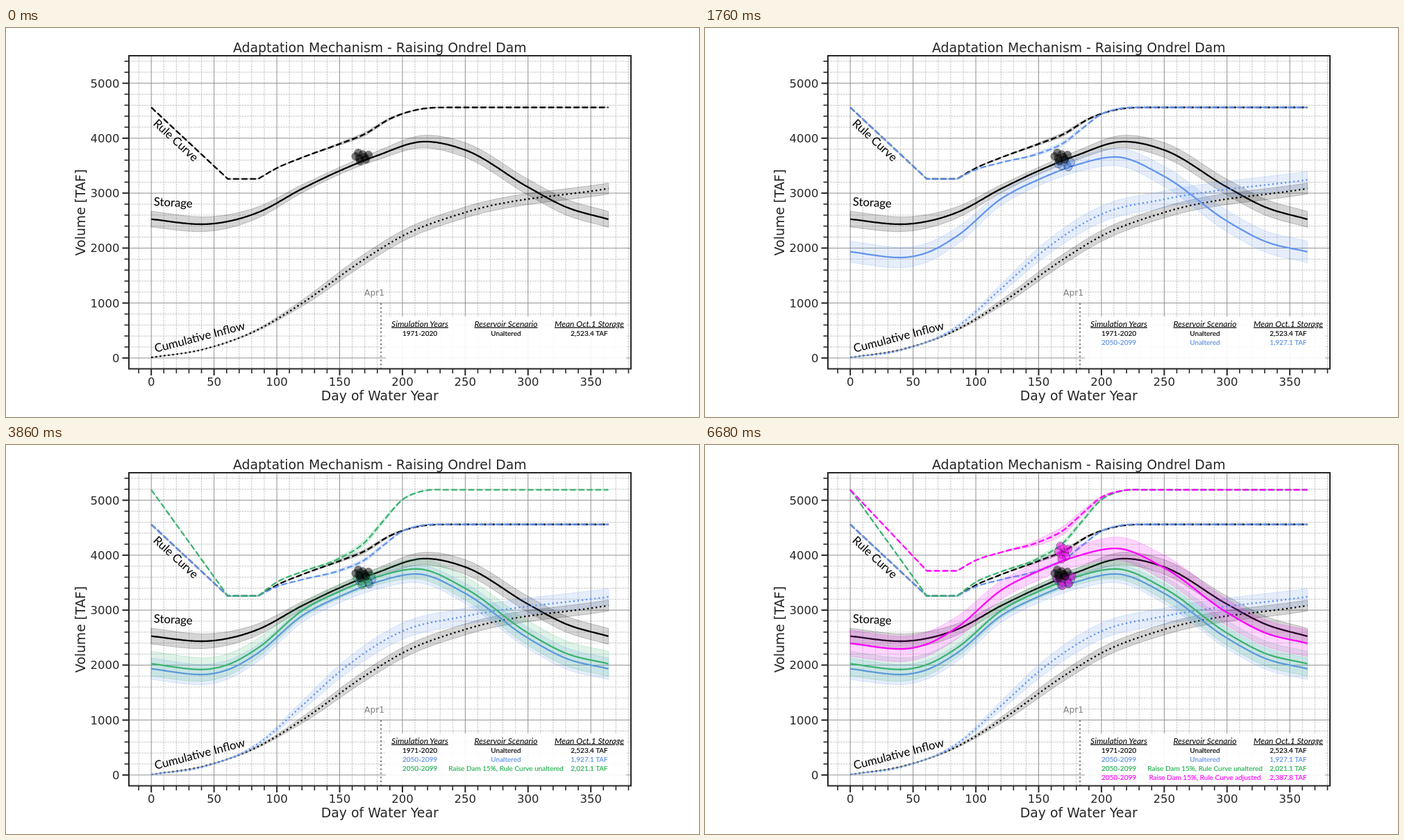
Recreate the animation shown at these times as an HTML page. Size 998 px wide and 561 px high, loop 8000 ms.

```html
<!DOCTYPE html>
<html lang="en">
<head>
<meta charset="utf-8">
<style>
html, body { margin: 0; width: 100%; height: 100%; overflow: hidden; background: #fff; }
svg { display: block; width: 100%; height: 100%; }
text { font-family: "DejaVu Sans", sans-serif; fill: #262626; }
.hand text { font-family: Lato, sans-serif; fill: inherit; }
</style>
</head>
<body>
<svg id="stage" viewBox="0 0 998 561"></svg>
<script>
const stage = document.getElementById('stage');
const LOOP = 8000, INK = '#262626';
const X = day => 209.2 + day * 1.8086;
const Y = taf => 475.9 - taf * 0.07925;

function add(parent, tag, attrs = {}, content = '') {
  const el = document.createElementNS('http://www.w3.org/2000/svg', tag);
  for (const key in attrs) el.setAttribute(key, attrs[key]);
  el.textContent = content;
  return parent.appendChild(el);
}
const line = (x1, y1, x2, y2, stroke, width, dash = 'none') =>
  add(stage, 'path', { d: `M${x1} ${y1}L${x2} ${y2}`, stroke, 'stroke-width': width, 'stroke-dasharray': dash });
const label = (parent, x, y, size, content, attrs = {}) =>
  add(parent, 'text', { x, y, 'font-size': size, 'text-anchor': 'middle', ...attrs }, content);

// Cubic Hermite curve through [day, value] points, flat at every extremum.
function curve(points) {
  const step = points.slice(1).map(([x], i) => x - points[i][0]);
  const slope = step.map((h, i) => (points[i + 1][1] - points[i][1]) / h);
  const tangent = points.map((_, i) => {
    const a = slope[i - 1], b = slope[i];
    if (a === undefined || b === undefined) return a ?? b;
    return a * b > 0 ? (a * step[i] + b * step[i - 1]) / (step[i] + step[i - 1]) : 0;
  });
  return day => {
    let i = 0;
    while (i < step.length - 1 && day >= points[i + 1][0]) i++;
    const h = step[i], t = (day - points[i][0]) / h, u = 1 - t;
    return points[i][1] * u * u * (1 + 2 * t) + points[i + 1][1] * t * t * (1 + 2 * u)
      + h * t * u * (tangent[i] * u - tangent[i + 1] * t);
  };
}
const bell = (day, mid, width) => Math.exp(-(((day - mid) / width) ** 2));

// Falls in a straight line, rests on the floor, then refills along `rise`.
const rule = (top, floor, rise) => day =>
  day < 61 ? top + (floor - top) * day / 61 : day < 85 ? floor : floor + (top - floor) * rise(day);

const pastRise = curve([[85, 0], [100, .152], [120, .298], [150, .49], [170, .628], [190, .84], [211, .965], [235, 1], [364, 1]]);
const futureRise = curve([[85, 0], [100, .13], [120, .228], [150, .355], [170, .505], [185, .71], [200, .906], [215, .985], [235, 1], [364, 1]]);

const pastStorage = curve([[0, 2526], [40, 2434], [61, 2485], [85, 2649], [120, 3078], [150, 3406],
  [180, 3684], [218, 3938], [250, 3784], [300, 3109], [330, 2750], [364, 2523]]);
const futureStorage = curve([[0, 1932], [40, 1828], [61, 1917], [85, 2220], [120, 2895], [150, 3248],
  [180, 3513], [211, 3658], [250, 3304], [300, 2491], [330, 2125], [364, 1932]]);

const pastInflow = curve([[0, 10], [40, 150], [85, 516], [120, 996], [170, 1803], [200, 2220], [250, 2649], [364, 3084]]);
const futureInflow = curve([[0, 10], [40, 138], [85, 567], [120, 1260], [150, 1879], [200, 2617], [250, 2888], [364, 3242]]);

// Spreads are half band widths; clusters are [x, y, rx, ry, dots].
const series = [
  {
    start: 0, color: '#000', ink: '#000', row: ['1971-2020', 'Unaltered', '2,523.4 TAF'],
    rule: rule(4560, 3258, pastRise), ruleSpread: 32,
    storage: pastStorage, wide: 145, narrow: 65,
    inflow: pastInflow, inflowSpread: 100, clusters: [[513, 186, 13, 7, 8]]
  },
  {
    start: 500, color: '#6495ed', ink: '#5b8de0', row: ['2050-2099', 'Unaltered', '1,927.1 TAF'],
    rule: rule(4560, 3258, futureRise), ruleSpread: 38,
    storage: futureStorage, wide: 195, narrow: 114,
    inflow: futureInflow, inflowSpread: 150, clusters: [[518, 197, 11, 6, 6]]
  },
  {
    start: 2600, color: '#3cb371', ink: '#22b04f', row: ['2050-2099', 'Raise Dam 15%, Rule Curve unaltered', '2,021.1 TAF'],
    rule: rule(5190, 3258, futureRise), ruleSpread: 50,
    storage: day => futureStorage(day) + 92, wide: 227, narrow: 125, clusters: [[516, 193, 14, 10, 8]]
  },
  {
    start: 4700, color: '#f0f', ink: '#f0f', row: ['2050-2099', 'Raise Dam 15%, Rule Curve adjusted', '2,387.8 TAF'],
    rule: rule(5190, 3715, futureRise), ruleSpread: 75,
    storage: day => futureStorage(day) + 465, wide: 240, narrow: 165, clusters: [[516, 155, 10, 11, 8], [518, 194, 14, 10, 7]]
  }
];

function drawGrid() {
  for (const major of [false, true]) {
    const style = major ? ['#858585', .9] : ['#a6a6a6', .7, '2.4 1.3'];
    for (let d = -10; d <= 380; d += 10)
      if ((d % 50 === 0) === major) line(X(d), 40, X(d), 491, ...style);
    for (let v = 0; v <= 5400; v += 200)
      if ((v % 1000 === 0) === major) line(177, Y(v), 900, Y(v), ...style);
  }
}

function drawAxes() {
  add(stage, 'rect', { x: 177, y: 40, width: 723, height: 451.5, fill: 'none', stroke: INK, 'stroke-width': 2 });
  for (let d = -10; d <= 380; d += 10) {
    const major = d % 50 === 0;
    line(X(d), 491.5, X(d), major ? 501 : 498, INK, major ? 2 : 1.6);
    if (major) label(stage, X(d), 515.5, 16.5, d);
  }
  for (let v = 0; v <= 5400; v += 200) {
    const major = v % 1000 === 0;
    line(177, Y(v), major ? 167.5 : 170.5, Y(v), INK, major ? 2 : 1.6);
    if (major) label(stage, 163.5, Y(v) + 6, 16.5, v, { 'text-anchor': 'end' });
  }
  label(stage, 538.3, 35, 18.85, 'Adaptation Mechanism - Raising Ondrel Dam');
  label(stage, 538.3, 537, 18.85, 'Day of Water Year');
  label(stage, 0, 0, 18.85, 'Volume [TAF]', { transform: 'translate(113.5 266) rotate(-90)' });
}

const days = Array.from({ length: 365 }, (_, i) => i);
const trace = (f, list = days) => list.map(d => `${X(d).toFixed(1)} ${Y(f(d)).toFixed(2)}`).join('L');

function drawCurve(group, color, mid, half, dash = 'none') {
  const upper = trace(d => mid(d) + half(d));
  const lower = trace(d => mid(d) - half(d), [...days].reverse());
  add(group, 'path', { d: `M${upper}L${lower}Z`, fill: color, 'fill-opacity': .16, stroke: color, 'stroke-opacity': .22 });
  add(group, 'path', { d: 'M' + trace(mid), fill: 'none', stroke: color, 'stroke-width': 2.3, 'stroke-dasharray': dash });
}

// Dots fill an ellipse along a golden-angle spiral.
function drawCluster(group, color, [x, y, rx, ry, count]) {
  for (let k = 0; k < count; k++) {
    const r = Math.sqrt((k + .5) / count), a = k * 2.4;
    add(group, 'circle', {
      cx: x + rx * r * Math.cos(a), cy: y + ry * r * Math.sin(a), r: 5.6,
      fill: color, stroke: '#000', 'stroke-width': .8, opacity: .52
    });
  }
}

const columns = [596, 720, 840];

function drawSeries(s, i) {
  const lines = add(chart, 'g'), marks = add(markers, 'g');
  const row = add(legend, 'g', { fill: s.ink, stroke: s.ink, 'stroke-width': .15 });
  drawCurve(lines, s.color, s.rule, d => s.ruleSpread * bell(d, 168, 30), '8.5 3.7');
  drawCurve(lines, s.color, s.storage, d => s.wide - (s.wide - s.narrow) * bell(d, 145, 75));
  if (s.inflow) drawCurve(lines, s.color, s.inflow, d => s.inflowSpread / (1 + Math.exp((115 - d) / 20)), '2.3 3.8');
  for (const cluster of s.clusters) drawCluster(marks, s.color, cluster);
  s.row.forEach((cell, c) => label(row, columns[c], 443.8 + i * 13.2, 10, cell));
  s.groups = [lines, marks, row];
}

drawGrid();
const chart = add(stage, 'g', { 'stroke-linejoin': 'round' });
const markers = add(stage, 'g');
add(stage, 'rect', { x: 547, y: 416, width: 346, height: 74, fill: '#fff', opacity: .9 });
line(540, 397, 540, 491, '#808080', 2.2, '2.2 3.6');
label(stage, 530.5, 385.5, 12.2, 'Apr1', { style: 'fill:#808080' });
drawAxes();

const legend = add(stage, 'g', { class: 'hand' });
['Simulation Years', 'Reservoir Scenario', 'Mean Oct.1 Storage'].forEach((head, c) =>
  label(legend, columns[c], 430.5, 12, head, { 'font-style': 'italic', 'text-decoration': 'underline' }));
const note = (x, y, angle, content) =>
  label(legend, 0, 0, 16.8, content, { 'text-anchor': 'start', transform: `translate(${x} ${y}) rotate(${angle})` });
note(211, 139, 42.5, 'Rule Curve');
note(212.5, 256, 3, 'Storage');
note(215.5, 468, -14.5, 'Cumulative Inflow');

series.forEach(drawSeries);
markers.append(series[0].groups[1]); // the baseline dots stay on top

function render(now) {
  const t = now % LOOP;
  for (const s of series)
    for (const g of s.groups) g.style.display = t >= s.start ? '' : 'none';
  requestAnimationFrame(render);
}
render(0);
</script>
</body>
</html>
```
